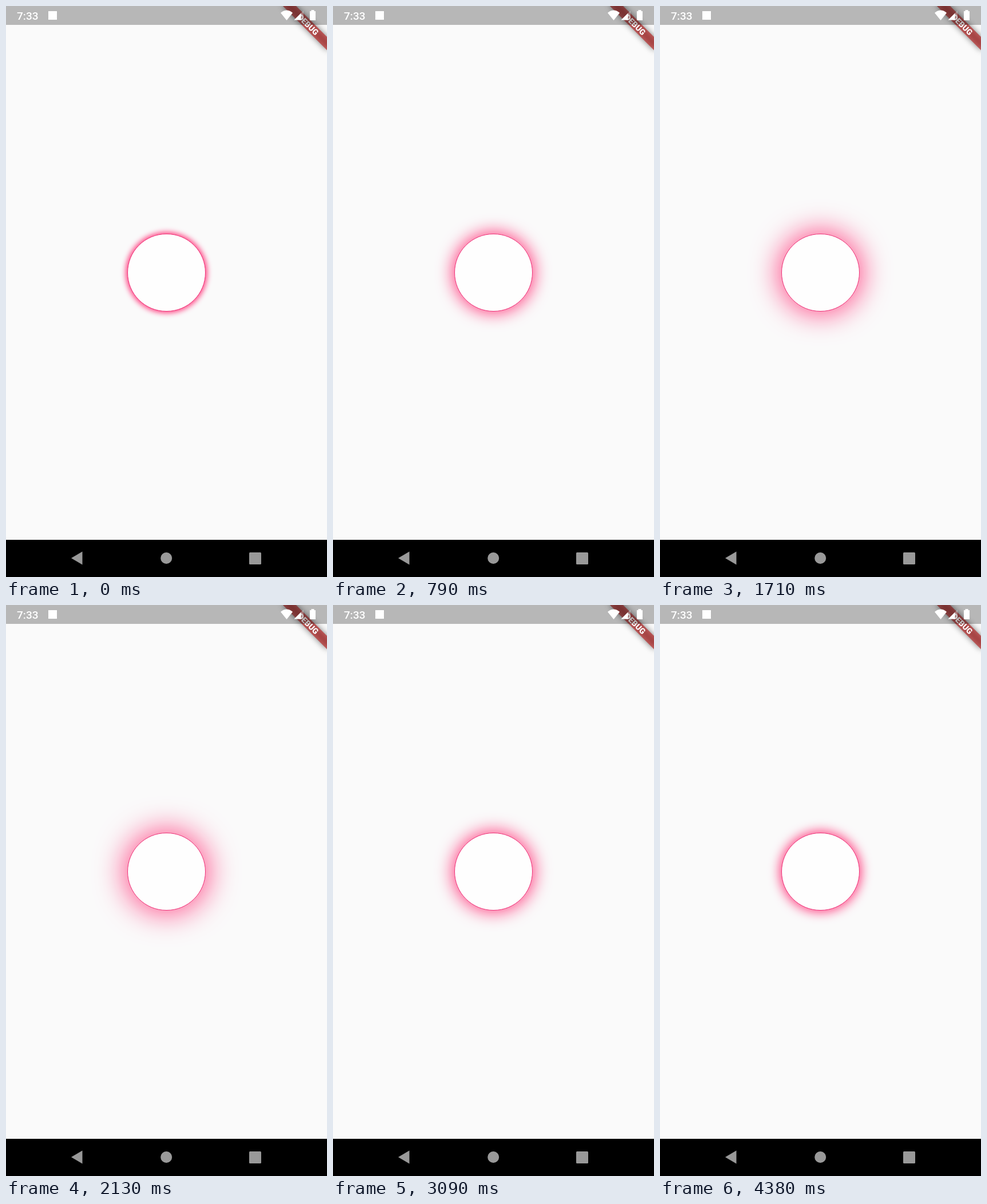
These frames come from a looping animation (561x998 px, 4.42 s). An HTML page:

```html
<!DOCTYPE html>
<html lang="en">
<head>
<meta charset="utf-8">
<title>Pulsing glow</title>
<style>
  html, body {
    margin: 0;
    width: 100%;
    height: 100%;
    overflow: hidden;
    background: #fafafa;
  }
  .stage {
    position: relative;
    width: 561px;
    height: 998px;
    overflow: hidden;
  }
  svg {
    position: absolute;
    inset: 0;
    font-family: Roboto, sans-serif;
    fill: #fff;
  }
  .orb {
    position: absolute;
    left: 212.4px;
    top: 398px;
    width: 136.2px;
    height: 136.2px;
    box-sizing: border-box;
    border: 1.36px solid #ee2f76;
    border-radius: 50%;
    background: #fefefe;
    animation: glow 4420ms linear infinite;
  }
  /* Two-second swell and two-second fade, cut off early in the next swell */
  @keyframes glow {
    0%     { box-shadow: 0 0 10px 2.7px #ff4081; }
    44.57% { box-shadow: 0 0 56.5px 2.7px #ff4081; }
    89.82% { box-shadow: 0 0 9.2px 2.7px #ff4081; }
    100%   { box-shadow: 0 0 19.8px 2.7px #ff4081; }
  }
  .shade { filter: blur(5.4px); }
</style>
</head>
<body>
<div class="stage">
  <div class="orb"></div>
  <svg width="561" height="998" viewBox="0 0 561 998">
    <!-- corner ribbon -->
    <g transform="translate(561 0) rotate(45)">
      <rect class="shade" x="-54.5" y="38.2" width="109" height="16.4" fill="#000" fill-opacity=".5"/>
      <rect x="-54.5" y="38.2" width="109" height="16.4" fill="#b71c1c" fill-opacity=".627"/>
      <text x="0" y="51.4" font-size="13.9" font-weight="900" text-anchor="middle">DEBUG</text>
    </g>

    <!-- status bar -->
    <rect width="561" height="33" fill="#000" fill-opacity=".27"/>
    <text x="19" y="24" font-size="19.1" font-weight="500">7:33</text>
    <rect x="74" y="9" width="15" height="15"/>
    <path d="M490.5 25 L480 12 Q490.5 3.2 501 12 Z"/>
    <path d="M520 8 V24.5 H503.5 Z" fill-opacity=".3"/>
    <path d="M515.5 12.5 V24.5 H503.5 Z"/>
    <path d="M533.5 7 H538.5 V9 H541 V25 H531 V9 H533.5 Z"/>

    <!-- navigation bar -->
    <rect y="933" width="561" height="65" fill="#000"/>
    <g fill="#999">
      <path d="M114 965 L133.5 953.6 V976.6 Z"/>
      <circle cx="280.2" cy="965" r="10"/>
      <rect x="425" y="955" width="21" height="21" rx="1.5"/>
    </g>
  </svg>
</div>
</body>
</html>
```
